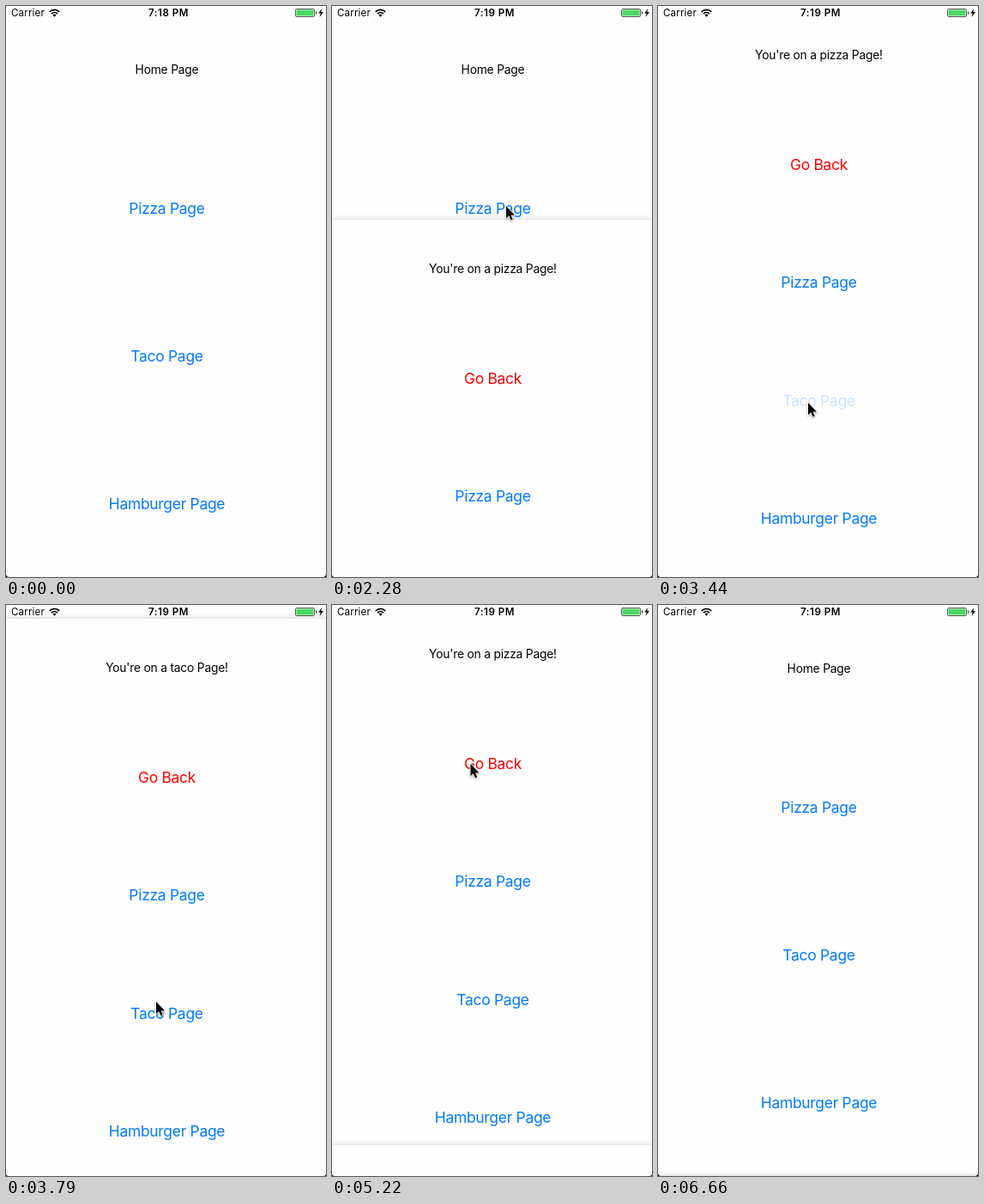
An HTML page for the animation above (7.42 s loop, 373 by 665 pixels).

```html
<!DOCTYPE html>
<html lang="en">
<head>
<meta charset="utf-8">
<title>Modal pages</title>
<style>
  html, body { margin: 0; width: 100%; height: 100%; overflow: hidden; background: #1c0d10; }
  #stage { position: relative; width: 373px; height: 665px; overflow: hidden; border-radius: 0 0 4px 4px;
    font-family: Inter, Roboto, sans-serif; color: #000; }
  .page { position: absolute; inset: 0; background: #fefefe; box-shadow: 0 0 7px rgba(0, 0, 0, .2); }
  .page div { position: absolute; left: 0; width: 375px; text-align: center; line-height: 20px;
    font-size: 17.4px; letter-spacing: -.25px; color: #007aff; white-space: nowrap; }
  .page .title { font-size: 13.8px; letter-spacing: -.2px; color: #000; }
  .page .back { color: #f00; }
  .status { position: absolute; top: 0; line-height: 16px; font-size: 11.6px; letter-spacing: .15px; white-space: nowrap; }
  #clock { left: 0; width: 379px; text-align: center; font-weight: 600; letter-spacing: .5px; }
  svg { position: absolute; left: 0; top: 0; overflow: visible; }
  #cursor { filter: drop-shadow(0 1px 1px rgba(0, 0, 0, .35)); }
</style>
</head>
<body>
<div id="stage">
  <div class="status" style="left:6px">Carrier</div>
  <div class="status" id="clock"></div>
  <svg width="373" height="18">
    <path d="M50.8 6.8a8 8 0 0 1 11.4 0M53 9.1a5 5 0 0 1 7 0" fill="none" stroke="#000" stroke-width="1.7"/>
    <path d="M54.5 10.5a3 3 0 0 1 4 0l-2 2.2z"/>
    <rect x="337.5" y="3.5" width="22" height="9" rx="1.6" fill="none" stroke="#555"/>
    <rect x="338.5" y="4.5" width="20" height="7" rx=".6" fill="#4cd964"/>
    <path d="M361 6.3q1.4 0 1.4 1.7t-1.4 1.7z" fill="#333"/>
    <path d="M368.2 3l-4 5.6h2.5l-1.2 4.4 4.4-6h-2.6z"/>
  </svg>
  <svg id="cursor" width="12" height="19">
    <path d="M0 0V14.2L3.2 11.2 5.5 16.4 7.8 15.4 5.5 10.4H10Z" stroke="#fff" stroke-width="1.6" paint-order="stroke"/>
  </svg>
</div>
<script>
const LOOP = 7420, HEIGHT = 665, RATE = 0.021, LINGER = 1300;
const stage = document.getElementById('stage');
const clock = document.getElementById('clock');
const cursor = document.getElementById('cursor');

function addPage(title, titleY, labels, firstY, gap) {
  const page = document.createElement('div');
  page.className = 'page';
  const addText = (text, y, kind) => {
    const el = document.createElement('div');
    el.textContent = text;
    el.className = kind;
    el.style.top = Math.round(y) - 10 + 'px';
    page.append(el);
    return el;
  };
  addText(title, titleY, 'title');
  page.buttons = labels.map((text, i) => addText(text, firstY + i * gap, text === 'Go Back' ? 'back' : 'link'));
  stage.insertBefore(page, stage.querySelector('.status'));
  return page;
}

const foods = ['Pizza Page', 'Taco Page', 'Hamburger Page'];
const modal = food => addPage(`You're on a ${food} Page!`, 57, ['Go Back', ...foods], 184.5, 137.5);
const home = addPage('Home Page', 74, foods, 236, 172);
const pizza = modal('pizza'), taco = modal('taco');

// Each modal is opened by one button and closed by its own first button
const modals = [
  { page: pizza, opener: home.buttons[0], press: 1990, show: 2180, pressBack: 6050, hide: 6150 },
  { page: taco, opener: pizza.buttons[2], press: 3440, show: 3525, pressBack: 4870, hide: 5000 }
];

const cursorStart = { x: 278, y: 541 };
const moves = [
  { at: 40, ms: 280, x: 191, y: 185 },
  { at: 510, ms: 290, x: 265, y: 250 },
  { at: 1100, ms: 520, x: 203, y: 233 },
  { at: 2890, ms: 470, x: 175, y: 462 },
  { at: 4180, ms: 450, x: 161.5, y: 185 }
];

// Critically damped spring: share of the distance still to go
const rest = ms => ms <= 0 ? 1 : (1 + RATE * ms) * Math.exp(-RATE * ms);
const easeOut = k => 1 - (1 - Math.min(1, Math.max(0, k))) ** 2.6;
const setVisible = (el, on) => el.style.visibility = on ? 'visible' : 'hidden';
const setPressed = (el, on) => el.style.opacity = on ? .2 : 1;

function draw(t) {
  clock.textContent = t < 1400 ? '7:18 PM' : '7:19 PM';

  for (const { page, opener, press, show, pressBack, hide } of modals) {
    const share = t < hide ? rest(t - show) : 1 - rest(t - hide);
    page.style.transform = `translateY(${Math.round(HEIGHT * share)}px)`;
    setVisible(page, t > show && t < hide + LINGER);
    setPressed(opener, t >= press && t < show);
    setPressed(page.buttons[0], t >= pressBack && t < hide);
  }

  let { x, y } = cursorStart;
  for (const move of moves) {
    const k = easeOut((t - move.at) / move.ms);
    x += (move.x - x) * k;
    y += (move.y - y) * k;
  }
  cursor.style.transform = `translate(${x}px, ${y}px)`;
  setVisible(cursor, t >= 60 && t < 6655);
}

const start = performance.now();
function tick() {
  draw((performance.now() - start) % LOOP);
  requestAnimationFrame(tick);
}
tick();
</script>
</body>
</html>
```
